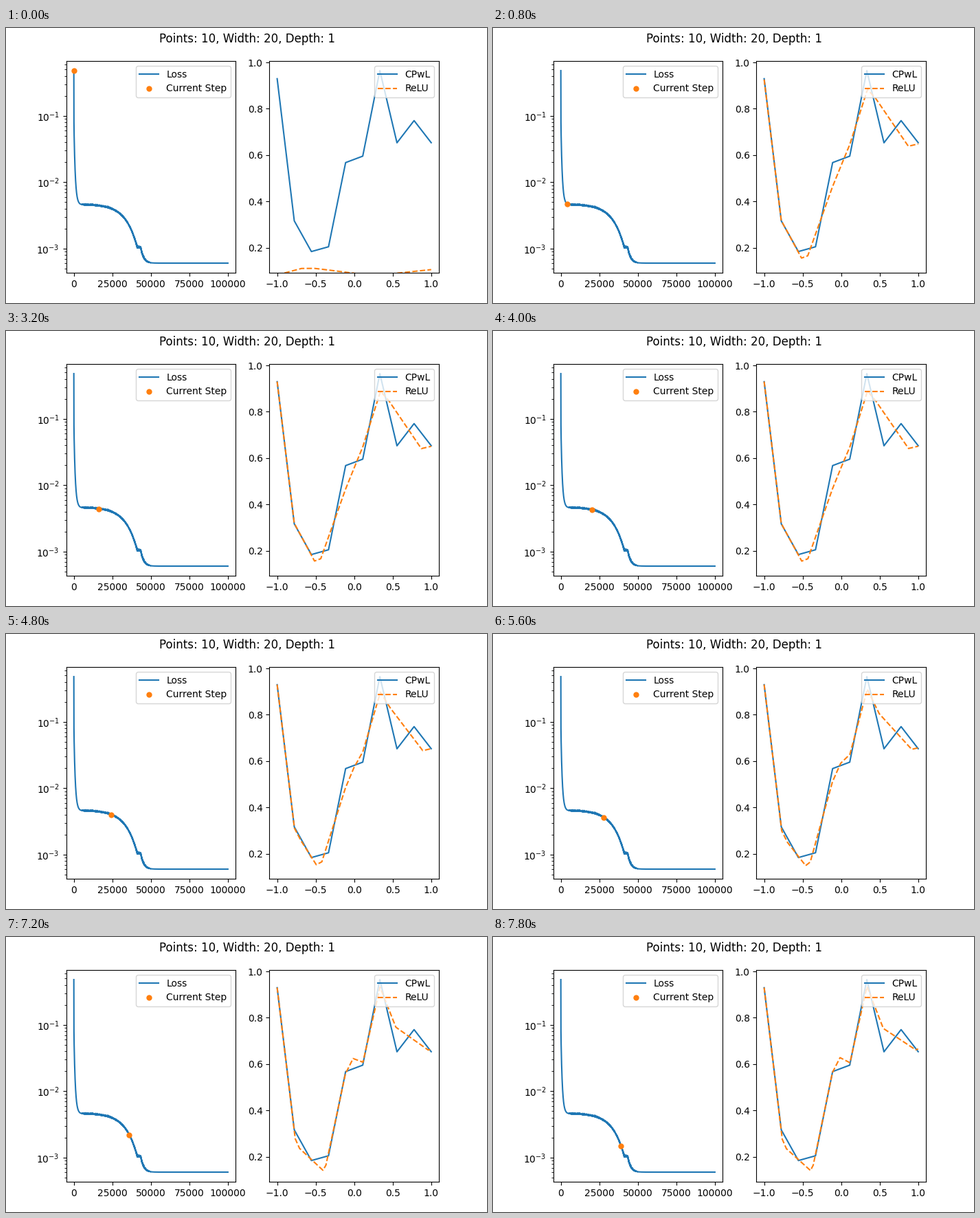
A matplotlib script that plays this animation: 700 by 400 pixels, repeating every 8 s.

```python
import numpy as np
import matplotlib.pyplot as plt
from matplotlib.animation import FuncAnimation

FRAMES = 40
INTERVAL = 200
STEPS_PER_FRAME = 1000

# Kinks of the fitted line (x, y) before and after it finds the middle bump
EARLY = np.array([(-1, .930), (-.778, .319), (-.684, .261), (-.515, .156),
                  (-.434, .166), (-.113, .465), (0, .558), (.112, .649),
                  (.342, .888), (.449, .848), (.872, .641), (1, .651)])
LATE = np.array([(-1, .930), (-.765, .276), (-.711, .235), (-.399, .141),
                 (-.363, .164), (-.113, .564), (-.015, .628), (.114, .606),
                 (.335, .935), (.547, .754), (.966, .662), (1, .665)])
LOWEST_FIT = 0.134


def smoothstep(t):
    t = np.clip(t, 0, 1)
    return t * t * (3 - 2 * t)


def untrained(x):
    return np.interp(x, [-1, -.65, -.5, .25, 1], [.083, .114, .111, .08, .106])


def loss_at(step):
    """Fast decay, plateau, accelerating fall, then a last drop to the floor."""
    k = np.asarray(step) / 1000
    start = 0.72 * np.exp(-k / 0.03) + 1.3 * np.exp(-k / 0.9)
    fall = np.minimum(0.136 * np.exp(0.136 * (k - 29.6)), 0.655)
    drop = 0.228 * (1 - np.exp(-np.maximum(k - 43.4, 0) / 1.8))
    return 10 ** (-2.335 + start - fall - drop)


def noisy_loss(steps):
    k = steps / 1000
    rng = np.random.default_rng(4)
    amp = 0.006 * smoothstep((k - 4) / 4) + 0.006 * smoothstep((k - 38) / 4)
    amp = amp * (1 - smoothstep((k - 43) / 8))
    return loss_at(steps) * 10 ** (amp * np.abs(rng.normal(size=k.size)))


def network(step):
    x, y = (EARLY + smoothstep((step / 1000 - 18) / 21) * (LATE - EARLY)).T
    remaining = np.exp(-2.3 * (step / 1000) ** 0.6)
    return x, y + remaining * (untrained(x) - y)


fig, (ax_loss, ax_fit) = plt.subplots(1, 2, figsize=(7, 4), dpi=100)
fig.suptitle("Points: 10, Width: 20, Depth: 1", x=0.501, y=0.9825)

steps = np.arange(0, 100001, 20)
ax_loss.plot(steps, noisy_loss(steps), label="Loss")
dot, = ax_loss.plot([0], [loss_at(0)], "o", markersize=5, label="Current Step")
ax_loss.set_yscale("log")
ax_loss.legend(loc="upper right")

values = np.random.RandomState(12345).rand(10)
ax_fit.plot(np.linspace(-1, 1, 10), values, label="CPwL")
fit, = ax_fit.plot([], [], "--", label="ReLU")
pad = 0.05 * (values.max() - LOWEST_FIT)
ax_fit.set_xlim(-1.1, 1.1)
ax_fit.set_ylim(LOWEST_FIT - pad, values.max() + pad)
ax_fit.legend(loc="upper right")


def update(frame):
    step = frame * STEPS_PER_FRAME
    dot.set_data([step], [loss_at(step)])
    fit.set_data(*network(step))
    return dot, fit


anim = FuncAnimation(fig, update, frames=FRAMES, interval=INTERVAL,
                     repeat=True, repeat_delay=0)
plt.show()
```
